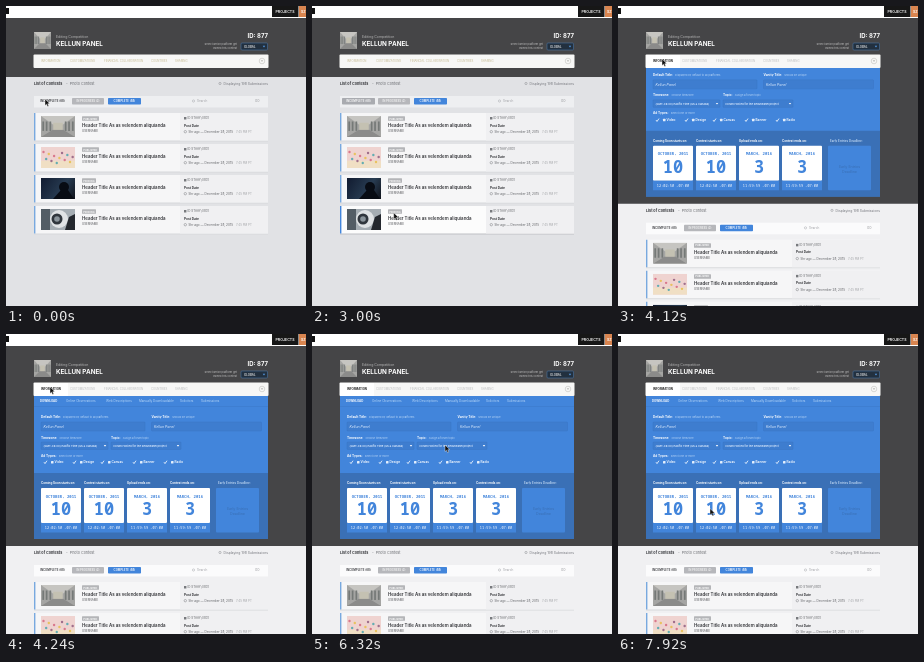
Recreate the animation shown at these times as an HTML page with a canvas. Size 300 by 300 pixels, loop 7960 ms.

```html
<!DOCTYPE html>
<html lang="en">
<head>
<meta charset="utf-8">
<title>Contest dashboard</title>
<style>
  html, body { margin: 0; width: 100%; height: 100%; overflow: hidden; background: #e1e2e5; }
  canvas { display: block; width: 300px; height: 300px; }
</style>
</head>
<body>
<canvas id="stage"></canvas>
<script>
const LOOP = 7960, FRAME = 40, PANEL = 141, PANEL_OPENS = 4000;
const BLUE = '#4285db', DEEP_BLUE = '#3a70b6', DARK = '#454547', INK = '#333438';
const SANS = 'Inter, sans-serif', MONO = '"Noto Sans Mono", monospace';
const stage = document.getElementById('stage');
const c = stage.getContext('2d');
const scale = window.devicePixelRatio || 1;
stage.width = stage.height = 300 * scale;

// Pointer tip: time, x, y
const pointerPath = [
  [0, 39, 93], [800, 82, 94], [1080, 116, 94], [1400, 116, 93],
  [1760, 90, 118], [2160, 84, 126], [2960, 82, 208], [3720, 44, 53],
  [4760, 44, 53], [5000, 59.5, 91], [5440, 59.5, 91], [6200, 133, 111],
  [6320, 133, 111], [6800, 150, 107], [7000, 150, 107], [7760, 95, 164],
  [7920, 92, 174.5]
];

const mix = (a, b, p) => a + (b - a) * p;

function pointerAt(t) {
  const i = pointerPath.findIndex(k => k[0] > t);
  if (i < 0) return pointerPath[pointerPath.length - 1].slice(1);
  const [t0, x0, y0] = pointerPath[i - 1], [t1, x1, y1] = pointerPath[i];
  const u = (t - t0) / (t1 - t0), p = u * u * (3 - 2 * u);
  return [mix(x0, x1, p), mix(y0, y1, p)];
}

function panelHeight(t) {
  const u = Math.min(1, Math.max(0, (t - 3956) / 240));
  return t < PANEL_OPENS ? 0 : PANEL * (1 - (1 - u) ** 2);
}

function box(x, y, w, h, color, radius = 0) {
  c.fillStyle = color;
  c.beginPath();
  c.roundRect(x, y, w, h, radius);
  c.fill();
}

function outline(x, y, w, h, color, radius = 0) {
  c.strokeStyle = color;
  c.lineWidth = .5;
  c.beginPath();
  c.roundRect(x, y, w, h, radius);
  c.stroke();
}

function disc(x, y, r, color) {
  c.fillStyle = color;
  c.beginPath();
  c.arc(x, y, r, 0, Math.PI * 2);
  c.fill();
}

function ring(x, y, r, color) {
  c.strokeStyle = color;
  c.lineWidth = .5;
  c.beginPath();
  c.arc(x, y, r, 0, Math.PI * 2);
  c.stroke();
}

function shape(color, ...points) {
  c.fillStyle = color;
  c.beginPath();
  points.forEach(([x, y]) => c.lineTo(x, y));
  c.fill();
}

function text(str, x, y, size, color, style = '400', align = 'left', family = SANS) {
  c.font = `${style} ${size}px ${family}`;
  c.textAlign = align;
  c.fillStyle = color;
  c.fillText(str, x, y);
}

function arrowDown(x, y, color) {
  shape(color, [x - 1.2, y - .7], [x + 1.2, y - .7], [x, y + .9]);
}

function drawGallery(x, y, w, h) {
  box(x, y, w, h, '#a5a5a3');
  shape('#c6c5c1', [x, y], [x + w, y], [x + w * .65, y + h * .4], [x + w * .35, y + h * .4]);
  shape('#8b8b8a', [x, y + h], [x + w, y + h], [x + w * .65, y + h * .65], [x + w * .35, y + h * .65]);
  box(x + w * .36, y + h * .32, w * .28, h * .34, '#c4c1b2');
  for (const p of [.04, .14, .25, .7, .8, .91]) box(x + w * p, y + h * .26, w * .05, h * .45, '#757977');
}

function drawCandy(x, y, w, h) {
  box(x, y, w, h, '#efd3d0');
  box(x, y + h * .65, w, h * .35, '#f0dfc4');
  const colors = ['#d9788c', '#63adb2', '#e9c25f', '#a06f8c'];
  for (let i = 0; i < 12; i++)
    disc(x + 2.5 + i * 2.65, y + 5 + (i * 7 % 12), 1.2, colors[i % 4]);
}

function drawNight(x, y, w, h) {
  const g = c.createLinearGradient(x, y, x + w, y + h);
  g.addColorStop(0, '#111b30');
  g.addColorStop(.6, '#283c52');
  g.addColorStop(1, '#10131b');
  box(x, y, w, h, g);
  disc(x + 23, y + 9, 5, '#080c14');
  shape('#080c14', [x + 12, y + h], [x + 20, y + 12], [x + 27, y + 12], [x + 33, y + h]);
}

function drawHelmet(x, y, w, h) {
  box(x, y, w, h, '#a5adb3');
  box(x, y, 9, h, '#535d65');
  disc(x + 18, y + 10, 9, '#e0e3e5');
  disc(x + 16, y + 10, 5.5, '#30363d');
  disc(x + 16, y + 10, 2.8, '#8a949b');
  shape('#24282e', [x + 24, y + h], [x + 28, y + 8], [x + w, y + 5], [x + w, y + h]);
}

const thumbnails = [drawGallery, drawCandy, drawNight, drawHelmet];

function drawTopBar() {
  box(0, 0, 300, 12, '#fff');
  box(0, 2, 3, 6, '#111');
  box(266, 0, 26.5, 11, '#171717');
  text('PROJECTS', 279, 6.5, 3.6, '#fff', '600', 'center');
  box(293, 0, 7, 11, '#d98550');
  text('SZ', 295, 6.5, 3.6, '#fff', '600');
}

function drawHeader(t, open) {
  box(0, 12, 300, 59 + open, DARK);
  drawGallery(28, 26, 17, 17);
  text('Editing Competition', 50, 31.5, 3.5, '#b8b8b8');
  text('KELLUN PANEL', 50, 39.8, 6.3, '#fff', '700');
  text('ID: 877', 262, 32.3, 6, '#fff', '700', 'right');
  text('Select which platform get', 231, 38.7, 2.7, '#c4c4c4', '400', 'right');
  text('owned this contest', 231, 42.7, 2.7, '#c4c4c4', '400', 'right');
  box(235, 37, 26.5, 7, '#22303f', 1);
  outline(235, 37, 26.5, 7, '#4d7db3', 1);
  text('GLOBAL', 238, 41.5, 2.9, '#e5e5e5', '600');
  arrowDown(258, 40.5, '#569be8');

  box(27.5, 48.5, 235, 13.5, '#f7f7f6', 1);
  const hovered = t >= 3680;
  if (hovered) box(28, 49, 34, 13, '#fff');
  const tabs = [['INFORMATION', 35], ['CUSTOMIZATIONS', 64], ['FINANCIAL COLLABORATION', 98],
    ['COUNTRIES', 145], ['SHARING', 169]];
  tabs.forEach(([name, x], i) => {
    const active = i === 0 && hovered;
    const color = active ? '#222' : t >= PANEL_OPENS ? '#bbbcbd' : '#c4b991';
    text(name, x, 56.2, 2.8, color, active ? '700' : '400');
  });
  ring(256, 55, 2.8, '#b6b6b3');
  arrowDown(256, 55, '#b6b6b3');
}

function label(title, note, x, y) {
  text(title, x, y, 3.2, '#fff', '700');
  const width = c.measureText(title).width;
  text(note, x + width + 2, y, 2.7, '#bcd8f7');
}

function input(x, y, w, h, value, style, select) {
  box(x, y, w, h, '#3e7dcf', .7);
  outline(x, y, w, h, '#3a75c3', .7);
  text(value, x + 2.5, y + h / 2 + 1.2, select ? 2.7 : 3.5, '#e3efff', style);
  if (select) arrowDown(x + w - 3, y + h / 2, '#fff');
}

function drawDate(title, x, month, day, time) {
  text(title, x, 149.8, 3, '#fff', '700');
  box(x, 154, 40, 35, '#fff', 1);
  box(x, 189, 40, 9.5, BLUE);
  text(month, x + 20, 163.6, 3.95, BLUE, '600', 'center', MONO);
  text(day, x + 20, 181, 17, BLUE, '700', 'center', MONO);
  text(time, x + 20, 195.3, 3.6, '#fff', '400', 'center', MONO);
}

function drawPanel(open) {
  if (!open) return;
  c.save();
  c.beginPath();
  c.rect(0, 62, 300, open + 2);
  c.clip();
  c.translate(0, open - PANEL);
  box(28, 61, 234, 144, BLUE);
  box(28, 72, 234, .5, '#3b78c8');
  text('DOWNLOAD', 34, 67.7, 2.9, '#fff', '700');
  [['Online Observations', 60], ['Web Descriptions', 100], ['Manually Downloadable', 133],
    ['Solicitors', 174], ['Submissions', 195]]
    .forEach(([name, x]) => text(name, x, 67.7, 3.1, '#b9d7f7'));

  label('Default Title:', 'Displayed by default to all platforms', 35, 84);
  label('Vanity Title:', 'Should be unique', 145.5, 84);
  input(35, 88, 104, 9, 'Kellun Panel', 'italic 400');
  input(145.5, 88, 110, 9, 'Kellun Panel', 'italic 400');
  label('Timezone:', 'Choose timezone', 35, 104.5);
  label('Topic:', 'Assign a forum topic', 105, 104.5);
  input(35, 108, 67, 7.5, '(GMT-08:00) Pacific Time (US & Canada)', '600', true);
  input(105, 108, 70, 7.5, 'Forum Hosted for the KellunPanel project', '600', true);
  label('Ad Types:', 'Select one or more', 35, 122.5);
  [['Video', 38], ['Design', 67], ['Canvas', 95], ['Banner', 127], ['Radio', 158]]
    .forEach(([name, x]) => {
      c.strokeStyle = '#fff';
      c.lineWidth = .8;
      c.beginPath();
      c.moveTo(x, 128.2);
      c.lineTo(x + 1, 129.6);
      c.lineTo(x + 3, 126.7);
      c.stroke();
      box(x + 7, 127, 2.5, 2.5, '#e4effc', .5);
      text(name, x + 10.5, 129.4, 3.2, '#fff', '600');
    });

  box(28, 139, 234, 66, DEEP_BLUE);
  drawDate('Coming Soon starts on:', 35, 'OCTOBER, 2015', '10', '12:02:50 -07:00');
  drawDate('Contest starts on:', 78, 'OCTOBER, 2015', '10', '12:02:50 -07:00');
  drawDate('Upload ends on:', 121, 'MARCH, 2016', '3', '11:59:59 -07:00');
  drawDate('Contest ends on:', 164, 'MARCH, 2016', '3', '11:59:59 -07:00');
  text('Early Entries Deadline:', 212, 149.8, 3, '#c3daf4', '600');
  box(210, 154, 43, 44.5, BLUE, 1);
  text('Early Entries', 231.5, 176, 3.6, DEEP_BLUE, '400', 'center');
  text('Deadline', 231.5, 181, 3.6, DEEP_BLUE, '400', 'center');
  c.restore();
}

function button(str, x, w, fill, color) {
  if (fill) box(x, 92, w, 6.5, fill, .8);
  text(str, x + w / 2, 96.3, 2.8, color, '600', 'center');
}

function drawCard(i, y, hovered) {
  box(28, y + .4, 234, 28, hovered ? '#bfc2c6' : '#d8d9dc');
  box(28, y, 234, 27.5, hovered ? '#fcfcfc' : '#f6f6f7');
  box(174, y, 88, 27.5, '#f0f0f2');
  box(28, y, 1.4, 27.5, hovered ? BLUE : '#78a9df');
  c.save();
  c.beginPath();
  c.rect(35, y + 3, 34, 21);
  c.clip();
  thumbnails[i](35, y + 3, 34, 21);
  c.restore();
  const published = i < 2;
  box(76, y + 3.3, published ? 17 : 14, 4.5, '#b4b5b8', .5);
  text(published ? 'PUBLISHED' : 'PENDING', 77.3, y + 6.5, 2.5, '#fff', '600');
  text('Header Title As as velendem aliquianda', 76, y + 14, 4.4, INK, '600');
  text('USERNAME', 76, y + 19, 2.9, '#55565a');
  box(178, y + 4, 2.4, 2.5, '#77797d');
  text('ID STAAY/0831', 181.5, y + 6.4, 3, '#66686c');
  text('Post Date', 178, y + 13.6, 3.2, INK, '700');
  ring(179.3, y + 18.7, 1.2, '#77797d');
  text('5hr ago — December 28, 2015', 182.5, y + 20, 3.1, '#606266');
  text('7:45 PM PT', 230, y + 20, 2.9, '#a0a2a6');
}

function drawList(t, open, pointerY) {
  c.save();
  c.translate(0, open);
  box(0, 69, 300, 231, t < PANEL_OPENS ? '#e1e2e5' : '#f0f0f2');
  text('List of Contests', 28, 78.7, 3.7, INK, '700');
  text('-  Photo Contest', 60, 78.7, 3.7, '#67696e');
  text('Displaying 198 Submissions', 262, 78.7, 3.4, '#77797f', '400', 'right');
  ring(214, 77.5, 1.1, '#85878b');
  box(28, 90, 234, 11.5, t < PANEL_OPENS ? '#eeeff1' : '#fbfbfc');
  const switched = t >= 840 && t < PANEL_OPENS;
  button('INCOMPLETE (68)', 30, 33, switched && '#a9abb0', switched ? '#fff' : INK);
  button('IN PROGRESS (2)', 66, 32, '#b6b7bb', '#f5f5f5');
  button('COMPLETE (88)', 102, 33, BLUE, '#fff');
  ring(187.5, 95, 1.1, '#a3a4a8');
  text('Search', 191, 96.3, 3.1, '#a3a4a8');
  text('GO', 249, 96.3, 2.9, '#85878b');
  for (let i = 0; i < 4; i++) {
    const y = 107 + 31 * i, top = y + open;
    drawCard(i, y, pointerY >= top && pointerY < top + 28);
  }
  c.restore();
}

function drawPointer(x, y) {
  c.save();
  c.translate(x, y);
  c.beginPath();
  [[0, 0], [0, 6.5], [1.5, 5.2], [2.6, 7.6], [3.8, 7], [2.7, 4.8], [4.7, 4.6]]
    .forEach(([px, py]) => c.lineTo(px, py));
  c.closePath();
  c.fillStyle = '#111';
  c.fill();
  c.strokeStyle = '#fff';
  c.lineWidth = .4;
  c.stroke();
  c.restore();
}

function draw(now) {
  const t = Math.floor((now % LOOP) / FRAME) * FRAME;
  const open = panelHeight(t);
  const [x, y] = pointerAt(t);
  c.setTransform(scale, 0, 0, scale, 0, 0);
  drawList(t, open, y);
  drawTopBar();
  drawHeader(t, open);
  drawPanel(open);
  drawPointer(x, y);
}

const start = performance.now();
function tick() {
  draw(performance.now() - start);
  requestAnimationFrame(tick);
}
tick();
</script>
</body>
</html>
```
